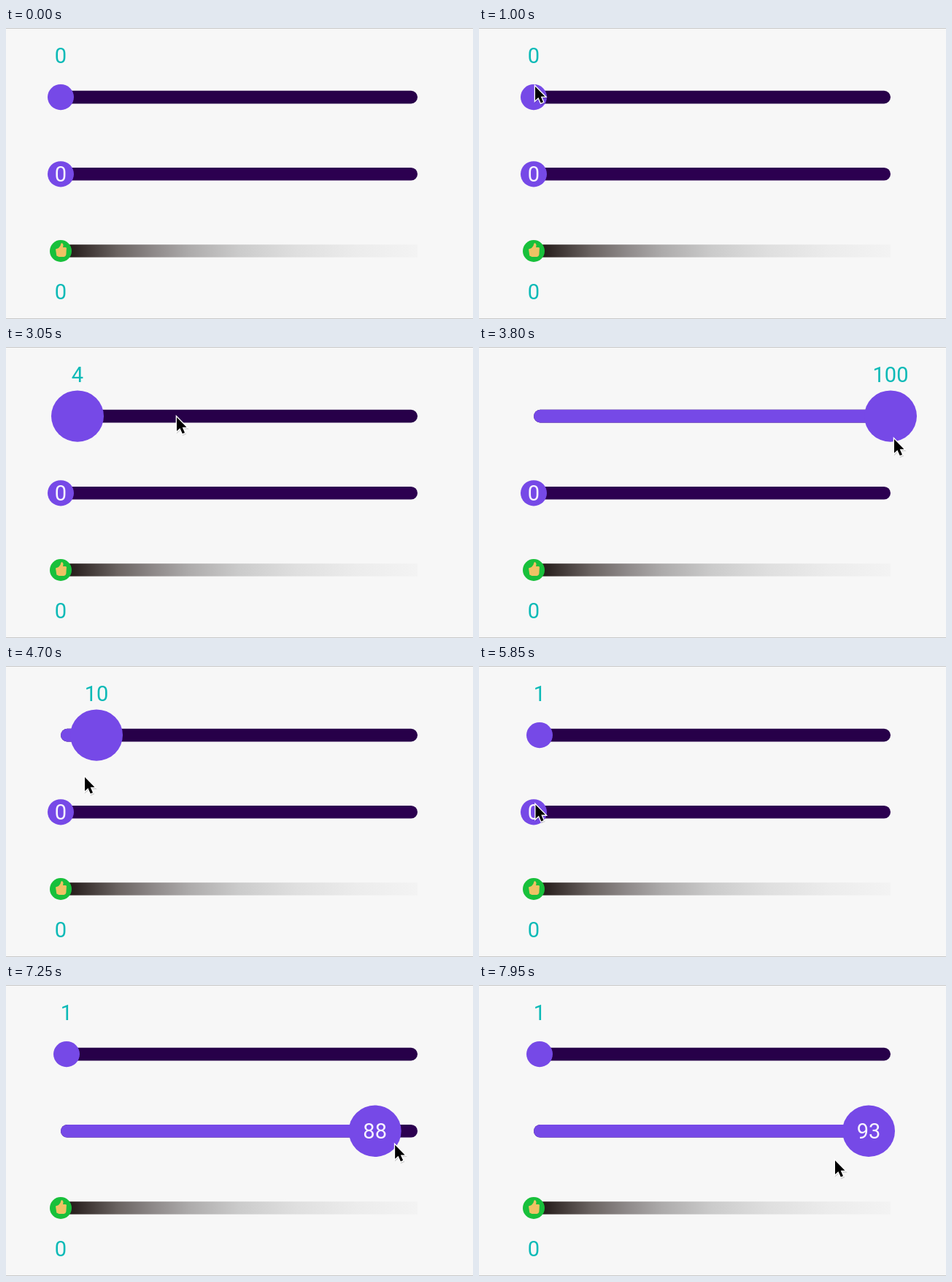
Animation, 640 px wide and 398 px high, one loop 8000 ms. Source, as an HTML page:

```html
<!DOCTYPE html>
<html lang="en">
<head>
<meta charset="utf-8">
<title>Sliders</title>
<style>
  html, body { margin: 0; width: 100%; height: 100%; overflow: hidden; background: #f7f7f7; }
  svg { display: block; width: 100vw; height: 100vh; }
  text { font: 29px Roboto, Arial, sans-serif; text-anchor: middle; fill: #0dbab7; }
  .inside { fill: #f8f5ff; }
  .accent { fill: #7649e7; }
</style>
</head>
<body>
<svg viewBox="0 0 640 398" preserveAspectRatio="none">
  <defs>
    <linearGradient id="fade">
      <stop offset="0" stop-color="#1c1210"/>
      <stop offset=".04" stop-color="#2c2321"/>
      <stop offset=".16" stop-color="#6a6361"/>
      <stop offset=".26" stop-color="#8e8989"/>
      <stop offset=".36" stop-color="#adabab"/>
      <stop offset=".5" stop-color="#cbcbcb"/>
      <stop offset=".66" stop-color="#dfdfdf"/>
      <stop offset=".83" stop-color="#ececec"/>
      <stop offset="1" stop-color="#f3f3f3"/>
    </linearGradient>
  </defs>
  <rect width="640" height="398" fill="#f7f7f7"/>
  <path d="M0 .5H640M0 397.5H640" stroke="#c9c9c9"/>

  <g id="upper">
    <rect x="75" y="85.8" width="489" height="17.6" rx="8.8" fill="#270049"/>
    <rect class="fill accent" x="75" y="85.8" height="17.6" rx="8.8"/>
    <ellipse class="knob accent" cy="94.6"/>
    <text y="48.3"></text>
  </g>

  <g id="middle">
    <rect x="75" y="191" width="489" height="17.6" rx="8.8" fill="#2c0050"/>
    <rect class="fill accent" x="75" y="191" height="17.6" rx="8.8"/>
    <ellipse class="knob accent" cy="199.8"/>
    <text class="inside" y="210.2"></text>
  </g>

  <rect x="75" y="296.2" width="489" height="17.4" fill="url(#fade)"/>
  <circle cx="75" cy="305" r="15" fill="#18c03b"/>
  <path d="M68 302.5L72 301Q75 298.500 75.200 295.500Q75.500 293.700 77 294.300Q79.400 295.700 78 300H81.500Q83.600 300.500 82.800 302.800L82.400 310Q82 312.600 79.500 312.900H72.500L69.300 311.500Z" fill="#efc264"/>
  <text x="75" y="371.300">0</text>

  <g id="cursor">
    <path d="M0 0V19L4.400 15L7.800 22.600L11 21.200L7.700 13.800H13.500Z" transform="translate(.8 1.600)" stroke="#000" stroke-width="2" opacity=".15"/>
    <path d="M0 0V19L4.400 15L7.800 22.600L11 21.200L7.700 13.800H13.500Z" stroke="#fff" stroke-width="2.600" paint-order="stroke"/>
  </g>
</svg>
<script>
const LOOP = 8000, STEP = 50, LAG = 50, LEFT = 75, RIGHT = 564;
const clamp = (v, lo, hi) => Math.min(hi, Math.max(lo, v));

// Pointer route: time, x, y
const route = [
  [500, 112, 142], [900, 77, 80], [2900, 77, 80], [2950, 85, 83],
  [3000, 98, 88], [3050, 234, 96], [3500, 566, 122], [3800, 569, 126],
  [3900, 569, 127], [4250, 370, 140], [4650, 124, 151], [4700, 108, 152],
  [4900, 83, 153], [5400, 83, 153], [5950, 77, 194], [6350, 77, 196],
  [6700, 234, 201], [6750, 260, 201], [7050, 420, 211], [7400, 578, 224],
  [7700, 580, 232], [7850, 552, 236], [7900, 534, 238], [7950, 488, 240]
];

// Monotone cubic through the route, so holds stay still and nothing overshoots
function along(time, axis) {
  const last = route.length - 1;
  const t = clamp(time, route[0][0], route[last][0]);
  const i = clamp(route.findIndex(p => p[0] > t) - 1, 0, last - 1);
  const k = t === route[last][0] ? last - 1 : i;
  const pitch = j => j < 0 || j >= last ? 0
    : (route[j + 1][axis] - route[j][axis]) / (route[j + 1][0] - route[j][0]);
  const slope = j => {
    const a = pitch(j - 1), b = pitch(j);
    return a * b > 0 ? 2 * a * b / (a + b) : 0;
  };
  const [p, q] = [route[k], route[k + 1]];
  const span = q[0] - p[0], u = (t - p[0]) / span, v = 1 - u;
  return p[axis] * v * v * (1 + 2 * u) + q[axis] * u * u * (3 - 2 * u)
    + span * (slope(k) * u * v * v - slope(k + 1) * u * u * v);
}

function ramp(t, start, length) {
  const u = clamp((t - start) / length, 0, 1);
  return u * u * (3 - 2 * u);
}

function dragged(t, from, to) {
  return t < from ? LEFT : clamp(along(Math.min(t, to) - LAG, 1), LEFT, RIGHT);
}

function makeSlider(id) {
  const group = document.getElementById(id);
  const fill = group.querySelector(".fill");
  const knob = group.querySelector(".knob");
  const label = group.querySelector("text");
  return (x, grow) => {
    fill.setAttribute("width", x - LEFT);
    knob.setAttribute("cx", x);
    knob.setAttribute("rx", 18 * (1 + grow));
    knob.setAttribute("ry", 17.6 * (1 + grow));
    label.setAttribute("x", x);
    label.textContent = Math.floor((x - LEFT) / (RIGHT - LEFT) * 100 + 1e-6);
  };
}

const upper = makeSlider("upper"), middle = makeSlider("middle");
const cursor = document.getElementById("cursor");

function draw(t) {
  upper(dragged(t, 2950, 5200), ramp(t, 2450, 200) - ramp(t, 5400, 200));
  middle(dragged(t, 6400, LOOP), ramp(t, 6150, 200));
  cursor.setAttribute("visibility", t < 500 ? "hidden" : "visible");
  cursor.setAttribute("transform", `translate(${along(t, 1)} ${along(t, 2)})`);
}

const begin = performance.now();
function tick(now) {
  const t = Math.max(0, now - begin) % LOOP;
  draw(Math.floor(t / STEP) * STEP);
  requestAnimationFrame(tick);
}
draw(0);
requestAnimationFrame(tick);
</script>
</body>
</html>
```
